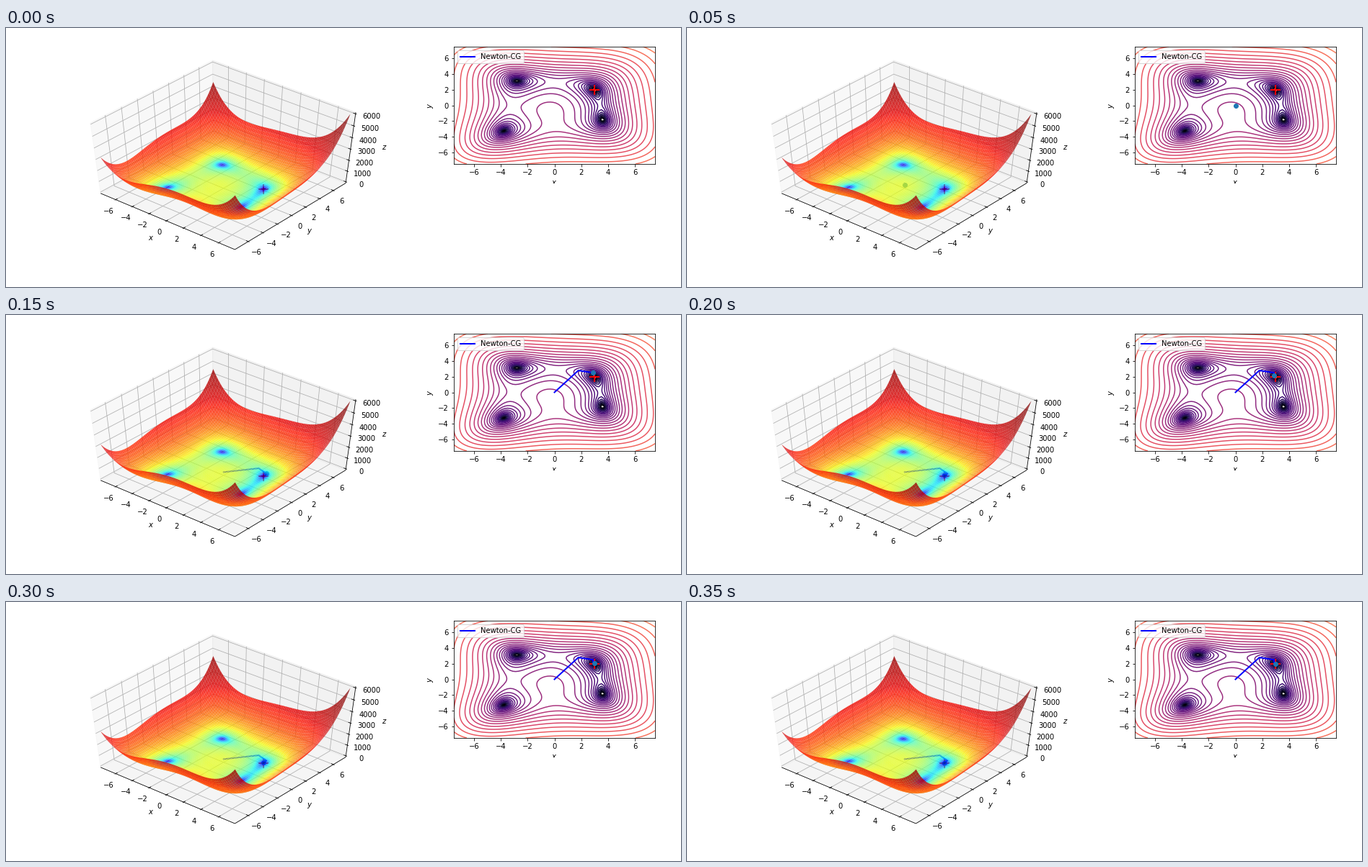
A matplotlib script for the animation above (0.55 s loop, 936x360 px).

```python
import numpy as np
import matplotlib.pyplot as plt
from matplotlib.animation import FuncAnimation
from matplotlib.collections import LineCollection, PolyCollection
from matplotlib.colors import LogNorm
from matplotlib.patches import Polygon, Rectangle

W, H, DPI = 936, 360, 72
LIM, STEP = 7.5, 0.2
FRAMES, INTERVAL = 11, 50

# Newton-CG iterates from the origin to the minimum
PATH = np.array([(0, 0), (1.78, 2.797), (2.9, 2.5), (2.85, 2.183),
                 (3.013, 2.086), (2.976, 2.04), (2.998, 2.008)])
MINIMUM = np.array([3.0, 2.0])


def himmelblau(x, y):
    return (x**2 + y - 11)**2 + (x + y**2 - 7)**2


side = np.linspace(-LIM, LIM, round(2 * LIM / STEP) + 1)
X, Y = np.meshgrid(side, side)
Z = himmelblau(X, Y)
ZMAX = Z.max()

# Perspective camera looking at the centre of a unit cube
ELEV, AZIM, DIST = np.radians(50), np.radians(-50), 10
EYE = np.array([np.cos(AZIM) * np.cos(ELEV), np.sin(AZIM) * np.cos(ELEV), np.sin(ELEV)])
RIGHT = np.array([-np.sin(AZIM), np.cos(AZIM), 0])
UP = np.cross(EYE, RIGHT)
CENTER, SCALE = np.array([301.8, 175.5]), np.array([2408, -1466])


def project(cube):
    """Cube coordinates (-0.5 to 0.5) to stage pixels and distance."""
    cube = np.asarray(cube, float)
    dist = DIST - cube @ EYE
    flat = np.stack([cube @ RIGHT, cube @ UP], axis=-1) / dist[..., None]
    return CENTER + SCALE * flat, dist


def to_cube(x, y, z):
    return np.stack([x / (2 * LIM), y / (2 * LIM), z / ZMAX - 0.5], axis=-1)


def pixels(points):
    return project(points)[0]


def on_surface(points):
    x, y = np.asarray(points, float).T
    return pixels(to_cube(x, y, himmelblau(x, y)))


fig = plt.figure(figsize=(W / DPI, H / DPI), dpi=DPI, facecolor="white")
plt.rcParams["font.family"] = "DejaVu Sans"
stage = fig.add_axes([0, 0, 1, 1])
stage.set(xlim=(0, W), ylim=(H, 0))
stage.axis("off")

# Panes, a little larger than the data box
E = 0.5 + 1 / 48
PANES = [
    (0.95, [(-E, -E, -E), (-E, E, -E), (-E, E, E), (-E, -E, E)]),
    (0.90, [(-E, E, -E), (E, E, -E), (E, E, E), (-E, E, E)]),
    (0.925, [(-E, -E, -E), (E, -E, -E), (E, E, -E), (-E, E, -E)]),
]
for shade, corners in PANES:
    stage.add_patch(Polygon(pixels(corners), color=(shade,) * 3 + (0.5,), lw=1, zorder=0))

OUT, IN = 0.1 / 12, 0.2 / 12
PAD = E + 0.0641
LABEL = E + 0.1394
grid, ticks = [], []


def tick_text(point, value):
    x, y = pixels(point)
    text = str(value).replace("-", "\u2212")
    stage.text(x, y, text, size=10, ha="center", va="top")


for value in range(-6, 7, 2):
    t = value / (2 * LIM)
    grid.append([(t, -E, -E), (t, E, -E), (t, E, E)])
    grid.append([(E, t, -E), (-E, t, -E), (-E, t, E)])
    ticks.append([(t, -E - OUT, -E), (t, -E + IN, -E)])
    ticks.append([(E + OUT, t, -E), (E - IN, t, -E)])
    tick_text((t, -PAD, -PAD), value)
    tick_text((PAD, t, -PAD), value)

for value in range(0, 6001, 1000):
    t = value / ZMAX - 0.5
    grid.append([(-E, -E, t), (-E, E, t), (E, E, t)])
    ticks.append([(E + OUT, E, t), (E - IN, E, t)])
    tick_text((PAD, PAD, t), value)

edges = [[(-E, -E, -E), (E, -E, -E)], [(E, -E, -E), (E, E, -E)], [(E, E, -E), (E, E, E)]]
for lines, color, order in ((grid, "#b0b0b0", 0.5), (edges + ticks, "black", 1)):
    stage.add_collection(LineCollection([pixels(p) for p in lines], colors=color,
                                        linewidths=0.8, zorder=order), autolim=False)

for name, point in (("x", (0, -LABEL, -LABEL)), ("y", (LABEL, 0, -LABEL)),
                    ("z", (LABEL, LABEL, 0))):
    stage.text(*pixels(point), f"${name}$", size=10, ha="center", va="center")


def quads(a):
    """Four corners of every grid cell."""
    cells = np.stack([a[:-1, :-1], a[:-1, 1:], a[1:, 1:], a[1:, :-1]], axis=2)
    return cells.reshape(-1, 4, *a.shape[2:])


# Surface, painted from back to front
flat, depth = project(to_cube(X, Y, Z))
order = np.argsort(-quads(depth).mean(axis=1))
surface = PolyCollection(quads(flat)[order], array=quads(Z).mean(axis=1)[order],
                         norm=LogNorm(), cmap="jet", edgecolors="none",
                         alpha=0.8, zorder=3)
stage.add_collection(surface, autolim=False)

# Contour plot
ax = fig.add_axes([621 / W, 1 - 189 / H, 279 / W, 163 / H])
ax.contour(X, Y, Z, levels=np.logspace(0, 5, 35), norm=LogNorm(), cmap="magma")
ax.set(xlim=(-LIM, LIM), ylim=(-LIM, LIM), xlabel="$x$", ylabel="$y$")
ax.set_xticks(range(-6, 7, 2))
ax.set_yticks(range(-6, 7, 2))


def add_trace(axes, place):
    axes.plot(*place([MINIMUM]).T, "r+", ms=14, mew=2, zorder=2)
    line, = axes.plot([], [], "b", lw=2, label="Newton-CG", zorder=2)
    dot, = axes.plot([], [], "o", color="C0", ms=6, zorder=2)
    return line, dot, place(PATH)


traces = [add_trace(stage, on_surface), add_trace(ax, np.array)]
ax.legend(handles=[traces[1][0]], loc="upper left")

# The lower part of the x label is cut off
fig.add_artist(Rectangle((560 / W, 0), 1 - 560 / W, 1 - 216 / H,
                         color="white", lw=0, zorder=10))


def update(frame):
    count = min(frame, len(PATH))
    for line, dot, points in traces:
        line.set_data(*points[:count].T)
        dot.set_data(*points[max(count - 1, 0):count].T)
    return [artist for trace in traces for artist in trace[:2]]


anim = FuncAnimation(fig, update, frames=FRAMES, interval=INTERVAL,
                     init_func=lambda: update(0), repeat=True, repeat_delay=0)
plt.show()
```
